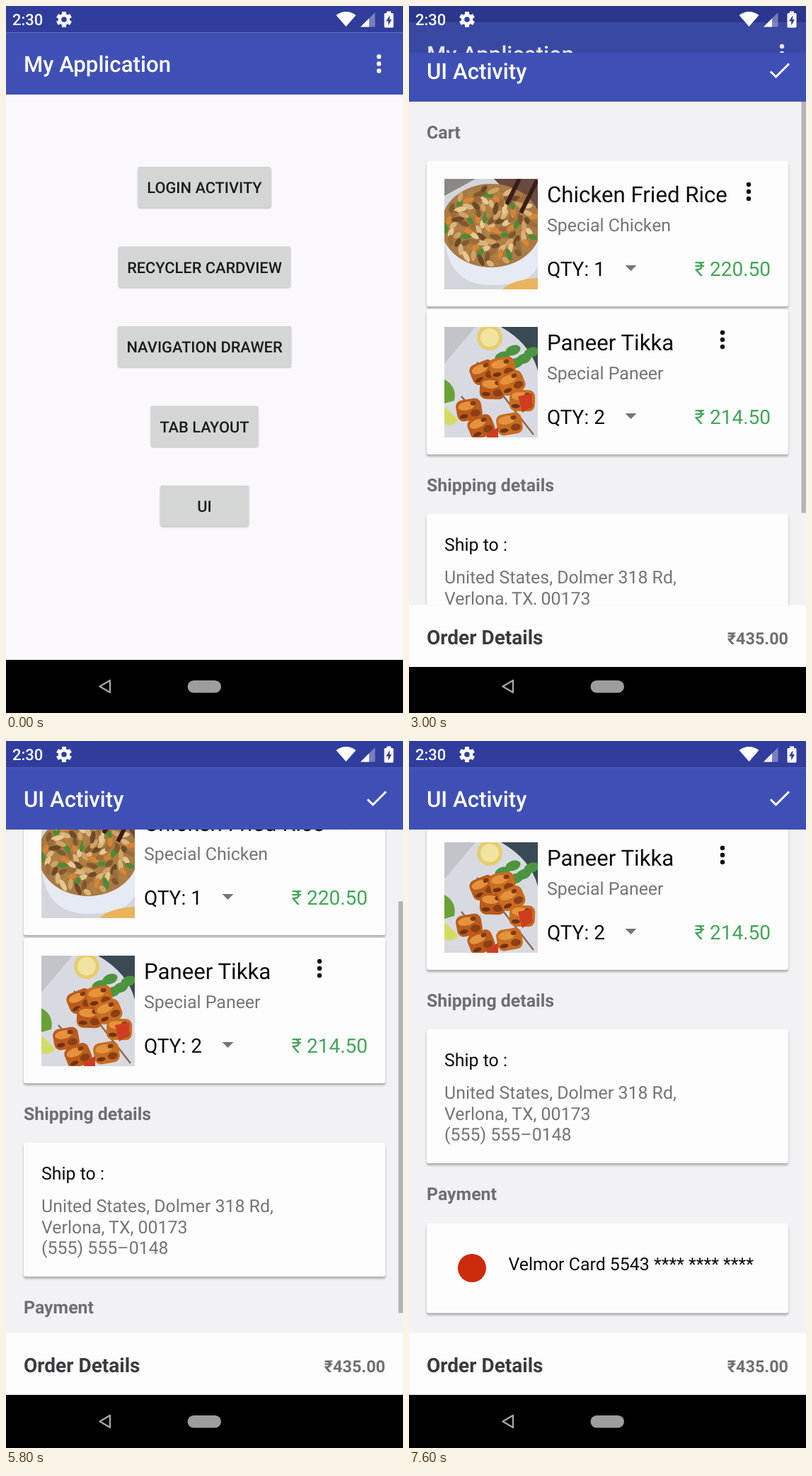
These frames come from a looping animation (561 px wide and 998 px high, 8000 ms). An HTML page:

```html
<!DOCTYPE html>
<html lang="en">
<head>
<meta charset="utf-8">
<title>Cart</title>
<style>
  html, body { margin: 0; width: 100%; height: 100%; overflow: hidden; background: #000; }
  svg { display: block; width: 100vw; height: 100vh; font-family: Roboto, "Noto Sans", sans-serif; }
  text { text-rendering: geometricPrecision; }
  .btn { fill: #d4d6d5; filter: drop-shadow(0 1.5px 1px rgba(0,0,0,.28)); }
  .btn.up { filter: drop-shadow(0 4px 4px rgba(0,0,0,.3)); }
  .card { fill: #fefdfe; filter: drop-shadow(0 0 .7px rgba(0,0,0,.14)) drop-shadow(0 3px 1.8px rgba(0,0,0,.28)); }
</style>
</head>
<body>
<svg id="stage" viewBox="0 0 561 998" preserveAspectRatio="none"></svg>
<script>
const LOOP = 8000, STEP = 200;
const MAX_SCROLL = 300, THUMB_RATIO = 0.7277;
const BLUE = '#3f50b5', DARK_BLUE = '#303d9d', GREY = '#757477', INK = '#0b0a0c';

const rect = (x, y, w, h, fill, extra = '') =>
  `<rect x="${x}" y="${y}" width="${w}" height="${h}" fill="${fill}" ${extra}/>`;
const circle = (x, y, r, fill) => `<circle cx="${x}" cy="${y}" r="${r}" fill="${fill}"/>`;
const blob = (x, y, rx, ry, fill, turn = 0) =>
  `<ellipse cx="${x}" cy="${y}" rx="${rx}" ry="${ry}" fill="${fill}" transform="rotate(${turn} ${x} ${y})"/>`;
const path = (d, fill, extra = '') => `<path d="${d}" fill="${fill}" ${extra}/>`;
const text = (x, y, size, fill, str, weight = 400, anchor = 'start') =>
  `<text x="${x}" y="${y}" font-size="${size}" fill="${fill}" font-weight="${weight}" text-anchor="${anchor}">${str}</text>`;
const group = (body, attrs = '') => `<g ${attrs}>${body}</g>`;
const dots = (x, y, fill) => [-10, 0, 10].map(d => circle(x, y + d, 3.2, fill)).join('');
const clip = (id, x, y, w, h) => `<clipPath id="${id}">${rect(x, y, w, h, '#000', `id="${id}Box"`)}</clipPath>`;

function button(y, w, label, id = '') {
  const x = 280.5 - w / 2;
  return rect(x, y, w, 57.5, '', `rx="3" class="btn" ${id && `id="${id}"`}`) +
    (id && group(`<circle id="ripple" cx="270" cy="711" r="0"/>`, 'clip-path="url(#press)"')) +
    text(280.5, y + 37, 21.8, '#1b1a1c', label, 500, 'middle');
}

function riceBowl() {
  const tones = ['#d9b57c', '#80592f', '#e6c893', '#b27f43', '#9a6d3b', '#cfa264', '#d98532', '#6b4a28', '#4f8a35'];
  const count = 110;
  let s = rect(0, 0, 132, 156, '#d3d5dc') +
    path('M70 0H132V70L92 22Z', '#6a4a3e') +
    path('M0 0H44L0 24Z', '#8d8883') +
    path('M0 60Q-4 150 66 150T134 108V50Z', '#e6eaf3') +
    path('M82 156Q96 142 132 140V156Z', '#e9b45c') +
    blob(66, 66, 71, 59, '#a87a45');
  for (let i = 0; i < count; i++) {
    const a = i * 2.4, r = Math.sqrt(i / count);
    s += blob(66 + 66 * r * Math.cos(a), 66 + 54 * r * Math.sin(a), 6 + i % 4, 3.6, tones[i * 5 % 9], i * 67);
  }
  return s + path('M88 36L106 0M108 48L131 2', 'none', 'stroke="#3a1d1b" stroke-width="6"');
}

function skewers() {
  const cubes = [[55, 64], [82, 58], [68, 87], [95, 79], [35, 117], [110, 104], [52, 141], [92, 137]];
  const cube = ([x, y], i) => group(
    rect(-18, -15, 36, 30, i % 2 ? '#c96c20' : '#bb5a1b', 'rx="9"') +
    blob(-3, -6, 12, 6, '#e4933c') + blob(8, 6, 7, 5, '#8a3f16') + blob(-9, 8, 6, 3, '#6e3313') +
    blob(7, -8, 4, 3, '#7d3b16'), `transform="translate(${x} ${y}) rotate(${-22 + i % 3 * 12})"`);
  return rect(0, 0, 132, 156, '#d8dae1') +
    path('M80 0H132V62Q122 24 80 0Z', '#3a4a55') +
    path('M0 0H44L0 52Z', '#c2c4ca') +
    circle(64, 15, 18, '#e5cd6c') + circle(64, 15, 13, '#f1e3a0') +
    path('M0 74Q18 84 14 104L0 108Z', '#69a136') +
    path('M0 112L20 132Q10 142 0 137Z', '#d3dc62') +
    [[82, 42], [97, 33], [112, 45], [101, 51], [123, 36]].map(([x, y]) => blob(x, y, 11, 7, '#4c9440', -20)).join('') +
    path('M46 50L126 152M24 98L74 156', 'none', 'stroke="#8c6a50" stroke-width="2.5"') +
    cubes.map(cube).join('') +
    path('M104 98L124 94 124 112 110 121Z', '#cf3d20') +
    path('M60 150L76 142V156H60Z', '#cf3d20');
}

const card = (y, h) => rect(25, y, 511, h, '', 'rx="3" class="card"');
const heading = (y, str) => text(25, y, 24.9, '#6f6e72', str, 700);

function item(y, photo, name, note, qty, price, dotX) {
  return group(card(0, 205) +
    group(photo, 'transform="translate(50 25)" clip-path="url(#photo)"') +
    text(195, 57.5, 31.2, INK, name) +
    dots(dotX, 43, INK) +
    text(195, 99, 24.9, GREY, note) +
    text(195, 162, 28, INK, 'QTY: ' + qty) +
    path('M305.5 147H321.5L313.5 155Z', GREY) +
    text(511, 162, 28, '#43a556', '₹ ' + price, 400, 'end'), `transform="translate(0 ${y})"`);
}

function homeScreen() {
  return rect(0, 0, 561, 998, '#faf8fc') +
    rect(0, 37.5, 561, 87.5, BLUE) + rect(0, 0, 561, 37.5, DARK_BLUE) +
    text(25, 93, 31.2, '#fff', 'My Application', 500) + dots(527, 81.5, '#fff') +
    button(227, 188, 'LOGIN ACTIVITY') +
    button(339.5, 243, 'RECYCLER CARDVIEW') +
    button(452, 245, 'NAVIGATION DRAWER') +
    button(564.5, 151.5, 'TAB LAYOUT') +
    button(677, 125, 'UI', 'uiBtn');
}

function cartScreen() {
  const list =
    heading(176.5, 'Cart') +
    item(209, riceBowl(), 'Chicken Fried Rice', 'Special Chicken', 1, '220.50', 480) +
    item(418, skewers(), 'Paneer Tikka', 'Special Paneer', 2, '214.50', 443) +
    heading(675, 'Shipping details') +
    card(707, 189) +
    text(50, 758.5, 24.9, INK, 'Ship to :') +
    ['United States, Dolmer 318 Rd,', 'Verlona, TX, 00173', '(555) 555–0148']
      .map((s, i) => text(50, 805 + i * 29.5, 24.9, GREY, s)).join('') +
    heading(948, 'Payment') +
    card(980.5, 127) +
    circle(89, 1044, 20, '#cc2a0c') +
    text(140.5, 1047, 24.9, INK, 'Velmor Card 5543 **** **** ****');
  return rect(0, 37.5, 561, 885.5, '#f2f1f4') +
    group(group(list, 'id="list"') + rect(554.5, 124.5, 6.5, 581, '#000', 'id="thumb"'), 'clip-path="url(#view)"') +
    rect(0, 835.5, 561, 87.5, '#fefdfe') +
    text(25, 891, 28, '#3b3a3d', 'Order Details', 700) +
    text(536, 891, 23.4, '#6f6e72', '₹435.00', 700, 'end') +
    rect(0, 37.5, 561, 87.5, BLUE) + rect(0, 0, 561, 37.5, DARK_BLUE) +
    text(25, 93, 31.2, '#fff', 'UI Activity', 500) +
    path('M511 82.5L518.5 90 537 71.5', 'none', 'stroke="#fff" stroke-width="3"');
}

function statusIcons() {
  const teeth = [0, 60, 120].map(a => rect(-3, -11, 6, 22, '#fff', `rx="1" transform="rotate(${a})"`)).join('');
  return text(9, 27, 22, '#fff', '2:30', 500) +
    group(teeth + circle(0, 0, 8.2, '#fff') + circle(0, 0, 3.8, DARK_BLUE), 'transform="translate(82 19)"') +
    path('M466.5 13Q480.5 3 494.5 13L480.5 29Z', '#fff') +
    path('M501 29.5L521.5 9V29.5Z', '#fff', 'opacity=".35"') +
    path('M501 29.5L513 17.5V29.5Z', '#fff') +
    rect(534.5, 10, 13, 20.5, '#fff', 'rx="1.5"') + rect(538, 7.5, 6, 4, '#fff') +
    path('M542.5 13L537 21.5H540.2V27.5L545 19H542Z', DARK_BLUE);
}

function navBar() {
  return rect(0, 923, 561, 75, '#000') +
    path('M132.5 960.5L147 952V969Z', 'none', 'stroke="#a5a5a5" stroke-width="2.4" stroke-linejoin="round"') +
    rect(256.5, 952, 47.5, 17.5, '#9d9d9d', 'rx="8.7"');
}

const $ = id => document.getElementById(id);
$('stage').innerHTML =
  '<defs>' + clip('press', 218, 677, 125, 57.5) + clip('photo', 0, 0, 132, 156) +
  clip('view', 0, 124.5, 561, 711) + clip('reveal', 0, 0, 561, 923) + '</defs>' +
  group(homeScreen(), 'id="home"') + rect(0, 0, 561, 998, '#000', 'id="dim"') + navBar() +
  group(group(cartScreen(), 'id="cart"'), 'id="cartWrap" clip-path="url(#reveal)"') + statusIcons();

const set = (id, attrs) => { for (const k in attrs) $(id).setAttribute(k, attrs[k]); };
const clamp = v => Math.max(0, Math.min(1, v));

// Linear interpolation through [time, value] stops.
function track(stops, t) {
  const i = stops.findIndex(s => s[0] > t);
  if (i === 0) return stops[0][1];
  if (i < 0) return stops[stops.length - 1][1];
  const [t0, a] = stops[i - 1], [t1, b] = stops[i];
  return a + (b - a) * (t - t0) / (t1 - t0);
}

const SCROLL = [[5400, 0], [5600, 70], [5800, 140], [6000, 178], [6200, 218.5], [6400, 294], [6600, MAX_SCROLL]];
const THUMB = [[4200, .26], [4400, .165], [4600, 0], [5400, 0], [5600, .26], [7200, .26], [7400, .165], [7600, 0]];

function draw(t) {
  const pressed = t >= 2400 && t < 2800;
  $('uiBtn').classList.toggle('up', pressed);
  set('ripple', {
    r: t < 2400 ? 0 : 69 + (t - 2400) * .4,
    'fill-opacity': track([[2600, .14], [2800, .05], [3000, 0]], t)
  });

  const open = t >= 3000;
  const k = open ? clamp((3200 - t) / 200) : 0;
  const top = k ? 37.5 + 28.5 * k : 0;
  set('home', { transform: `translate(0 ${-14.5 * k})` });
  set('dim', { opacity: .1 * k });
  set('cartWrap', { visibility: open ? 'visible' : 'hidden' });
  set('cart', { transform: `translate(0 ${10 * k})` });
  set('revealBox', { y: top, height: 923 + 10 * k - top });

  const scroll = track(SCROLL, t);
  set('list', { transform: `translate(0 ${-scroll})` });
  set('thumb', { y: 124.5 + scroll * THUMB_RATIO, 'fill-opacity': track(THUMB, t) });
}

const start = performance.now();
function tick() {
  const t = (performance.now() - start) % LOOP;
  draw(Math.floor(t / STEP) * STEP);
  requestAnimationFrame(tick);
}
tick();
</script>
</body>
</html>
```
